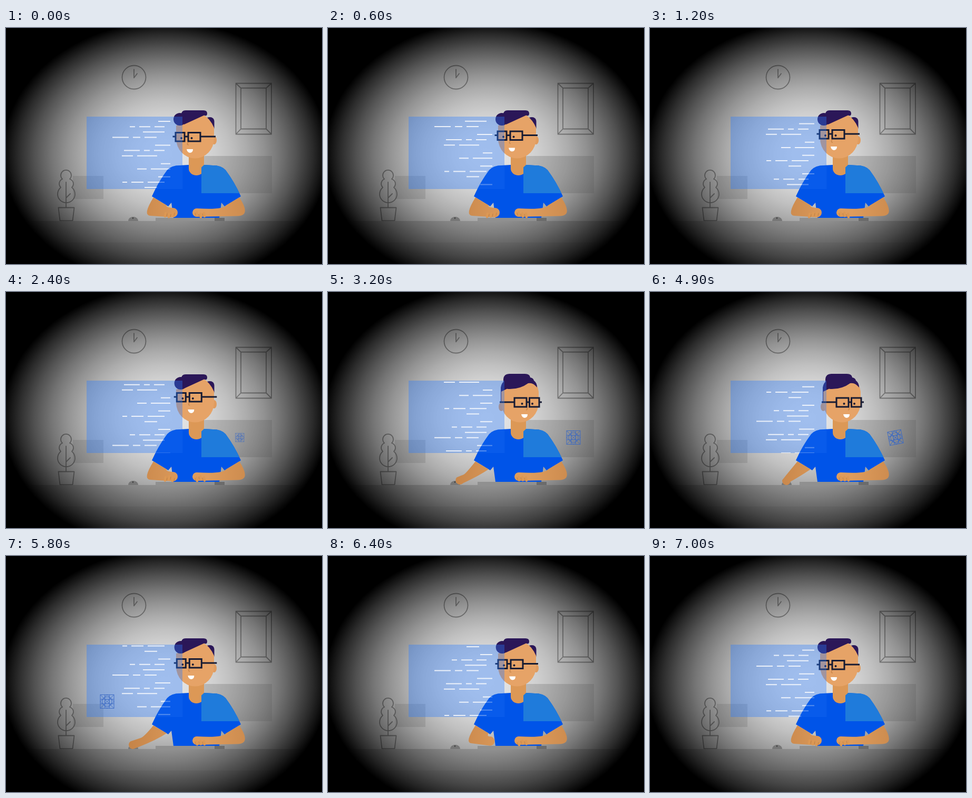
An HTML page that plays this animation: 600x450 px, repeating every 7100 ms.

```html
<!DOCTYPE html>
<html lang="en">
<head>
<meta charset="utf-8">
<title>At the desk</title>
<style>
html, body { margin: 0; width: 100%; height: 100%; overflow: hidden; background: #000; }
svg { display: block; width: 100vw; height: 100vh; }
</style>
</head>
<body>
<svg viewBox="0 0 600 450" xmlns="http://www.w3.org/2000/svg">
  <defs>
    <radialGradient id="shade" gradientUnits="userSpaceOnUse" cx="0" cy="0" r="1"
      gradientTransform="translate(303 240) scale(310 252)"/>
    <linearGradient id="skin" gradientUnits="userSpaceOnUse" x1="230" x2="340" y1="0" y2="0">
      <stop offset="0" stop-color="#c48348"/>
      <stop offset="1" stop-color="#de9c5c"/>
    </linearGradient>
    <clipPath id="screen"><rect x="153" y="169" width="183" height="138"/></clipPath>
    <clipPath id="card"><rect x="371" y="244" width="134" height="71"/></clipPath>
    <path id="half" d="M362 275L347 261L330 262Q314 262 306 271Q289 294 277 321L308 340L314 333L318 362H362Z"/>
    <g id="shirt"><use href="#half"/><use href="#half" transform="translate(723 0) scale(-1 1)"/></g>
  </defs>

  <rect width="600" height="450" fill="#f3f3f3"/>
  <g fill="none" stroke="#9c9c9c" stroke-width="1.800" stroke-linejoin="round" stroke-linecap="round">
    <circle cx="243" cy="94" r="22.5"/>
    <path d="M243 79V95L249 87"/>
    <path d="M436.500 105.500h67.500v97h-67.500zM446 114.500h48v78h-48zM436.500 105.500l9.500 9M504 105.500l-10 9M436.500 202.500l9.500-10M504 202.500l-10-10"/>
    <path d="M99.500 342.500H129.500L126.500 367.500H102.500ZM114 294V342M114 324L122 316"/>
    <path d="M107 288A10 10 0 1 1 121 288Q128 291 128 297Q128 301 125 304Q131 309 131 317A16.500 16 0 0 1 98 317Q98 309 104 304Q101 301 101 297Q101 291 107 288"/>
  </g>
  <rect y="368" width="600" height="41" fill="#cfcfcf"/>
  <rect y="409" width="600" height="41" fill="#c6c6c6"/>
  <rect width="600" height="450" fill="url(#shade)"/>
  <rect x="127" y="282" width="58" height="44" fill="#444" opacity=".16"/>
  <rect x="371" y="244" width="134" height="71" fill="#555" opacity=".24"/>

  <g id="mouse"><path d="M232 368A9.500 8 0 0 1 251 368Z" fill="#777"/><path d="M241 361V364" stroke="#333" stroke-width="1.500"/></g>
  <use href="#shirt" fill="#0054e8"/>
  <path d="M347 235H376V268A14.500 13 0 0 1 347 268Z" fill="#dc9856"/>

  <g id="headL">
    <rect x="378" y="170" width="17.500" height="28" rx="8" fill="#2b1758"/>
    <ellipse cx="395" cy="214" rx="5" ry="8" fill="#e09c5f"/>
    <path d="M323 186L374 165Q388 173 395 190V211A36 37.500 0 0 1 323 211Z" fill="#e6a367"/>
    <path d="M333 178V165Q333 157 341 157H375Q382 157 382 163Q382 169 376 166.500L338 184Z" fill="#2b1758"/>
    <circle class="quiff" cx="330" cy="174" r="12" fill="#2b1758"/>
  </g>
  <g id="faceL">
    <path d="M346 218Q342 223 347 223" fill="none" stroke="#c98649" stroke-width="1.300"/>
    <path d="M343 231H355Q355 238 349 238Q344 237 343 231Z" fill="#fff"/>
    <path d="M322 199.500H339V216H322ZM346 199.500H369V216H346ZM339 207H346M369 207H398M316.500 207H322" fill="none" stroke="#161b33" stroke-width="3"/>
    <circle cx="333" cy="210" r="2" fill="#161b33"/><circle cx="352.500" cy="210" r="2" fill="#161b33"/>
  </g>

  <g id="headR">
    <path d="M328 212V182Q330 170 340 168L350 190L336 212Z" fill="#2b1758"/>
    <ellipse cx="329" cy="219" rx="5" ry="8" fill="#e09c5f"/>
    <path d="M329 211V190L345 182L387 168Q398 175 400 190V211A35.500 37.500 0 0 1 329 211Z" fill="#e6a367"/>
    <path d="M333 176V166Q334 156 344 156H374Q383 156 384 163Q390 164 391 169Q397 173 397 182Q389 172 380 174Q364 186 342 185Q334 184 333 176Z" fill="#2b1758"/>
  </g>
  <g id="faceR">
    <path d="M376 219Q381 224 376 225" fill="none" stroke="#c98649" stroke-width="1.300"/>
    <path d="M367 233H379Q379 240 373 240Q368 239 367 233Z" fill="#fff"/>
    <path d="M354 202H377V219H354ZM382.500 202H401V219H382.500ZM377 210H382.500M326 210H354M401 210H406" fill="none" stroke="#161b33" stroke-width="3"/>
    <circle cx="368.500" cy="213" r="2" fill="#161b33"/><circle cx="388" cy="213" r="2" fill="#161b33"/>
  </g>

  <rect x="284" y="362" width="112" height="6" fill="#909090"/>
  <rect x="396" y="362" width="19" height="6" fill="#6b6b6b"/>
  <g id="armL"/>
  <g id="armR" transform="translate(723 0) scale(-1 1)"/>

  <rect x="153" y="169" width="182" height="138" fill="#287bff" opacity=".36"/>
  <g clip-path="url(#screen)">
    <path id="code" stroke="#fff" stroke-width="2" opacity=".82"/>
    <use href="#shirt" fill="#0558e8" opacity=".62"/>
  </g>
  <g clip-path="url(#card)"><use href="#shirt" fill="#1f7bdb"/></g>

  <g id="tile" fill="none" stroke="#3a69c4">
    <path d="M-13-13H13V13H-13ZM-13-4.300H13M-13 4.300H13M-4.300-13V13M4.300-13V13M-13-13L13 13M13-13L-13 13M0-13L13 0L0 13L-13 0Z"/>
    <circle r="4.300"/><circle r="9"/>
  </g>
</svg>
<script>
const LOOP = 7100, PERIOD = 141;
const NS = "http://www.w3.org/2000/svg";
const $ = id => document.getElementById(id);
const smooth = v => v * v * (3 - 2 * v);
const linear = v => v;
const mix = (a, b, p) => a + (b - a) * p;
const mixPt = (a, b, p) => a.map((v, i) => mix(v, b[i], p));
const move = (el, x, y) => el.setAttribute("transform", `translate(${x} ${y})`);
const show = (el, on) => el.setAttribute("visibility", on ? "visible" : "hidden");

function add(parent, tag, attrs) {
  const el = document.createElementNS(NS, tag);
  for (const k in attrs) el.setAttribute(k, attrs[k]);
  return parent.appendChild(el);
}

// keys: [time, value] pairs
function track(t, keys, ease = smooth) {
  if (t <= keys[0][0]) return keys[0][1];
  for (let i = 1; i < keys.length; i++) {
    const [t0, a] = keys[i - 1], [t1, b] = keys[i];
    if (t < t1) return mix(a, b, ease((t - t0) / (t1 - t0)));
  }
  return keys[keys.length - 1][1];
}

// ease from 0 to 1 over [a, b] and back over [c, d]
const pulse = (t, a, b, c, d, ease) => track(t, [[a, 0], [b, 1], [c, 1], [d, 0]], ease);

// the vignette darkens with the square of the distance
for (let r = 0; r <= 1; r += .1)
  add($("shade"), "stop", { offset: r, "stop-opacity": .06 + .94 * r * r });

// paragraphs of code; each row is its right end, then dash widths from the right
const paragraphs = [
  [[312, 23], [301, 19, 21, 10], [301, 41], [286, 23, 14, 31]],
  [[312, 29], [301, 20, 11, 30], [287, 38, 21]],
  [[312, 18], [312, 37, 18]],
  [[312, 23], [301, 32, 23, 9], [287, 24]]
];
let dashes = "", rowY = 178;
for (const rows of [...paragraphs, ...paragraphs]) {
  for (const [end, ...widths] of rows) {
    let x = end;
    for (const w of widths) {
      dashes += `M${x} ${rowY}h${-w}`;
      x -= w + 8;
    }
    rowY += 10.2;
  }
  rowY += 4.65;
}
$("code").setAttribute("d", dashes);

// elbow and inner are curve controls, hand is the middle of the palm
const typing = { elbow: [259, 357], hand: [317, 352], inner: [303, 342], size: 9 };
const gripping = { elbow: [262, 345], hand: [241, 360], inner: [284, 352], size: 8 };
const resting = { elbow: [257, 358], hand: [361, 352], inner: [310, 347], size: 8 };

function blend(a, b, p) {
  return {
    elbow: mixPt(a.elbow, b.elbow, p), hand: mixPt(a.hand, b.hand, p),
    inner: mixPt(a.inner, b.inner, p), size: mix(a.size, b.size, p)
  };
}

function limb({ elbow, hand, inner, size }) {
  const dx = hand[0] - elbow[0], dy = hand[1] - elbow[1], k = size / Math.hypot(dx, dy);
  const near = [hand[0] - dy * k, hand[1] + dx * k];
  const far = [hand[0] + dy * k, hand[1] - dx * k];
  const bend = mixPt(elbow, near, .25);
  return `M280 323Q${elbow} ${bend}L${near}A${size} ${size} 0 0 0 ${far}Q${inner} 305 338Z`;
}

function makeArm(id, palm) {
  const skin = add($(id), "path", { fill: "url(#skin)" });
  const fingers = [0, 1, 2].map(i => {
    const g = add($(id), "g", { "stroke-linecap": "round" }), x = palm - 14 + 7 * i;
    add(g, "path", { d: `M${x} 353l-1 6`, stroke: "#dc9854", "stroke-width": 4.5 });
    add(g, "path", { d: `M${x + 3} 354l-1 5`, stroke: "#b97a3e", "stroke-width": .8 });
    return g;
  });
  return { skin, fingers };
}

function poseArm({ skin, fingers }, pose, t, busy, seen) {
  skin.setAttribute("d", limb(pose));
  fingers.forEach((g, i) => {
    move(g, 0, 1.6 * busy * Math.sin(t / LOOP * 50 * Math.PI + i * 2.1));
    show(g, seen);
  });
}

const left = makeArm("armL", typing.hand[0]);
const right = makeArm("armR", resting.hand[0]);
const quiff = document.querySelector(".quiff");

const scroll = [[0, 0], [1200, 41], [2400, 57], [4900, 103], [5800, 122.5], [LOOP, PERIOD]];
const gaze = [[0, 0], [1200, -5], [2400, -7], [5800, -3], [7000, 0]];
const sway = [[3400, 0], [3750, 1], [4100, 0], [4800, 1], [4950, 1], [5550, 0]];

function draw(t) {
  move($("code"), 0, -track(t, scroll, linear));

  const turn = pulse(t, 2750, 3050, 5250, 5550), turned = turn >= .5;
  for (const id of ["headL", "faceL"]) show($(id), !turned);
  for (const id of ["headR", "faceR"]) show($(id), turned);
  const lean = 2.3 * pulse(t, 1200, 2400, 5800, 6900);
  move(quiff, lean * .7, 0);
  move($("faceL"), lean + turn * 16, track(t, gaze));
  move($("faceR"), (turn - 1) * 16, (turn - 1) * 5);

  const grip = pulse(t, 2850, 3300, 6050, 6500), swing = track(t, sway);
  const pose = blend(typing, gripping, grip);
  pose.hand[0] += swing * 18;
  poseArm(left, pose, t, 1, grip < .02);
  poseArm(right, resting, t, 1 - .8 * grip, true);
  move($("mouse"), swing * 18, 0);

  const x = track(t, [[2200, 437], [2800, 467], [4950, 467], [5600, 193]]);
  const grow = pulse(t, 2050, 2800, 6100, 6400, linear);
  $("tile").setAttribute("transform", `translate(${x - 1} 277.500) rotate(${-11 * swing}) scale(${.3 + .7 * grow})`);
  $("tile").setAttribute("opacity", .9 * Math.min(1, grow * 2));
}

function tick() {
  draw(performance.now() % LOOP);
  requestAnimationFrame(tick);
}
tick();
</script>
</body>
</html>
```
